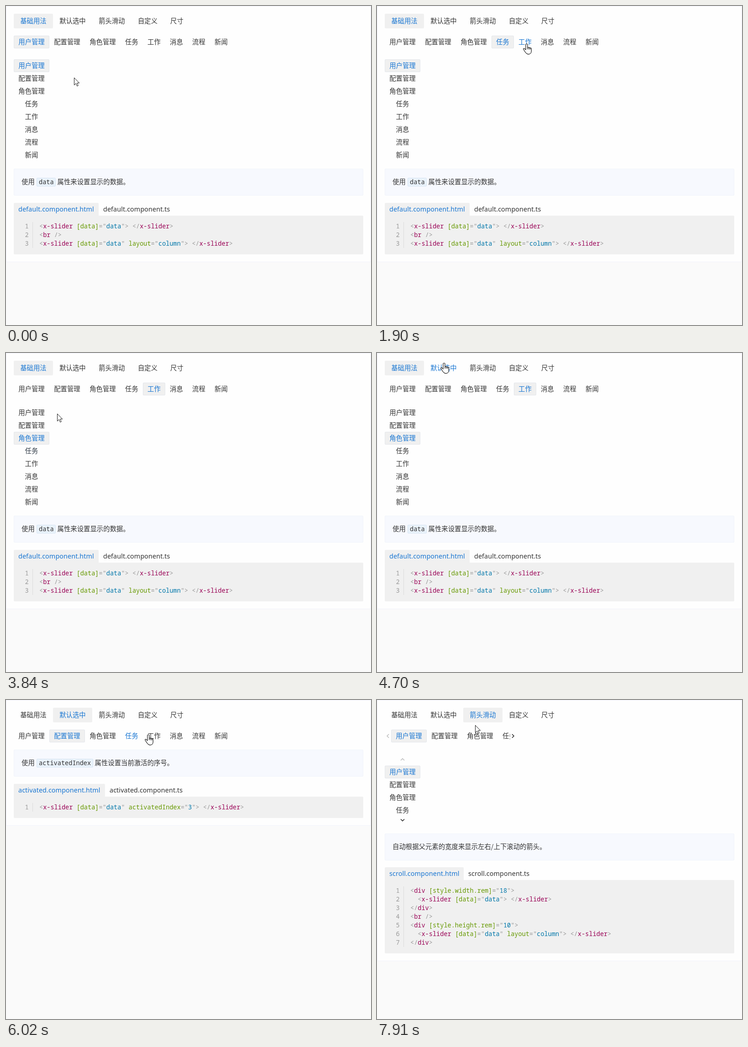
Write an HTML page that moves like this. It is 800 px wide and 700 px high and loops after 8 s.

```html
<!DOCTYPE html>
<html lang="zh-CN">
<head>
<meta charset="utf-8">
<title>Slider demo</title>
<style>
html, body { margin: 0; width: 100%; height: 100%; overflow: hidden; background: #fafafa; }
svg { display: block; }
text { font: 14.4px "Noto Sans CJK SC", "Noto Sans CJK", "Noto Sans CJK JP", sans-serif; fill: #333; white-space: pre; }
.mono { font: 13.6px "Noto Sans Mono", monospace; }
.file { font: 14.4px "Noto Sans", "Open Sans", sans-serif; letter-spacing: .06px; }
</style>
</head>
<body>
<svg id="stage" width="800" height="700"></svg>
<script>
const BLUE = '#1976d2', GREY = '#f0f0f0', LOOP = 8000;
const stage = document.getElementById('stage');

function add(parent, tag, attrs, text) {
  const el = document.createElementNS('http://www.w3.org/2000/svg', tag);
  for (const k in attrs) el.setAttribute(k, attrs[k]);
  if (text !== undefined) el.textContent = text;
  parent.append(el);
  return el;
}
const rect = (p, x, y, width, height, fill, more) =>
  add(p, 'rect', { x, y, width, height, fill, ...more });
const outlined = (p, x, y, w, h, fill, stroke) =>
  rect(p, x + .5, y + .5, w - 1, h - 1, fill, { stroke, rx: 1.5 });
const label = (p, x, y, s, more) => add(p, 'text', { x, y, ...more }, s);
const chevron = (p, x, y, turn, stroke) => add(p, 'path', {
  d: 'M-2 -4L2 0L-2 4', fill: 'none', stroke, 'stroke-width': 1.5,
  transform: `translate(${x} ${y}) rotate(${turn})` });

// A row or column of labels with one highlighted box.
function slider(parent, page, x, y, names, { column, tabs, first = 0 } = {}) {
  const h = tabs ? 32 : 28;
  const inset = tabs ? 0 : .5;
  const mark = tabs ? rect(parent, 0, 0, 1, 1, GREY, { rx: 2 })
                    : outlined(parent, 0, 0, 2, 2, GREY, '#e3e6eb');
  const items = names.map(name => {
    const w = column ? 78 : Math.floor(14.4 * name.length + (tabs ? 28.5 : 20.5));
    const item = { x, y, w, h };
    item.el = label(parent, x + (w - 14.4 * name.length) / 2, y + h / 2 + 5, name);
    column ? y += h : x += w;
    return item;
  });
  return { page, first, mark, inset, items };
}

function paint({ mark, inset, items, active }, t) {
  const a = items[active];
  const box = { x: a.x + inset, y: a.y + inset, width: a.w - 2 * inset, height: a.h - 2 * inset };
  for (const k in box) mark.setAttribute(k, box[k]);
  items.forEach((item, i) => {
    const k = i === active ? 1 : heat(item, t);
    const mix = [25, 118, 210].map(c => Math.round(51 + (c - 51) * k));
    item.el.style.fill = `rgb(${mix})`;
  });
}

function codeLine(parent, y, source) {
  const colors = ['#999', '#905', '#690', '#999', '#07a', '#999', '#999', '#333'];
  const el = label(parent, 73, y, '', { class: 'mono' });
  const token = /(<\/?)([\w-]+)|([\[\]\w.]+)(=")([^"]*)(")|(\/?>)|(\s+)/g;
  for (const m of source.matchAll(token))
    m.slice(1).forEach((s, i) => s && add(el, 'tspan', { fill: colors[i] }, s));
}

// Card with description, file tabs and listing; noteY and fileY are their tops.
function panel(noteY, fileY, file, fileW, [before, key, after], code) {
  const g = add(stage, 'g'), top = fileY + 28, h = code.length * 19 + 28;
  rect(g, .5, .5, 799, top + h + 16, '#fefefe', { stroke: '#f1f3fb' });
  outlined(g, 17, noteY, 766, 59, '#f7f9fe', '#f0f4fb');
  label(g, 34, noteY + 34, before);
  if (key) {
    const w = Math.round(8.16 * key.length + 9.6);
    outlined(g, 67, noteY + 20, w, 19, '#e9f2fb', '#d8e6f3');
    label(g, 72, noteY + 34, key, { class: 'mono' });
    label(g, 70.5 + w, noteY + 34, after);
  }
  rect(g, 17, fileY, fileW, 30, GREY, { rx: 2 });
  rect(g, 17, top, 766, h, GREY, { rx: 2 });
  label(g, 27, fileY + 19, file + '.component.html', { class: 'file', style: 'fill:' + BLUE });
  label(g, 27 + fileW, fileY + 19, file + '.component.ts', { class: 'file' });
  rect(g, 58, top + 14, 1, h - 28, '#dcdcdc');
  code.forEach((s, i) => {
    const y = top + 28 + 19 * i;
    label(g, 41.5, y, i + 1, { class: 'mono', style: 'fill:#999' });
    codeLine(g, y, s);
  });
  return g;
}

const names = ['用户管理', '配置管理', '角色管理', '任务', '工作', '消息', '流程', '新闻'];
const few = names.slice(0, 4);
const plain = '<x-slider [data]="data"> </x-slider>';
const upright = '<x-slider [data]="data" layout="column"> </x-slider>';

const basic = panel(357, 432, 'default', 186, ['使用', 'data', '属性来设置显示的数据。'],
  [plain, '<br />', upright]);
const preset = panel(109, 184, 'activated', 200, ['使用', 'activatedIndex', '属性设置当前激活的序号。'],
  ['<x-slider [data]="data" activatedIndex="3"> </x-slider>']);
const scroll = panel(293, 367, 'scroll', 173, ['自动根据父元素的宽度来显示左右/上下滚动的箭头。'],
  ['<div [style.width.rem]="18">', '  ' + plain, '</div>', '<br />',
   '<div [style.height.rem]="10">', '  ' + upright, '</div>']);
const panels = [basic, preset, scroll];

const clip = add(scroll, 'svg', { width: 292, height: 110 });
chevron(scroll, 24, 79, 180, '#bbb');
chevron(scroll, 298, 79, 0, '#222');
chevron(scroll, 56, 130.5, -90, '#bbb');
chevron(scroll, 56, 263.5, 90, '#222');

const tabs = slider(stage, null, 17, 17, ['基础用法', '默认选中', '箭头滑动', '自定义', '尺寸'], { tabs: true });
const views = [
  tabs,
  slider(basic, 0, 17, 65, names),
  slider(basic, 0, 17, 117, names, { column: true }),
  slider(preset, 1, 17, 65, names, { first: 3 }),
  slider(clip, 2, 31, 65, few),
  slider(scroll, 2, 17, 144, few, { column: true })
];
const visible = () => views.filter(v => v === tabs || v.page === tabs.active);

// Pointer stops: arrival time, x, y, whether it clicks there.
const REST = 140, PRESS = 100;
const stops = [
  [0, 149, 157], [580, 134, 83, true], [1000, 212, 84, true], [1400, 276, 84, true],
  [1650, 327, 83], [1900, 328, 83, true], [2420, 62, 160, true], [2600, 63, 187, true],
  [2890, 64, 289], [3050, 65, 288], [4350, 145, 26], [4700, 147, 22, true],
  [5480, 134, 80, true], [5840, 290, 78], [6020, 312, 76], [6240, 324, 81, true],
  [6440, 372, 82, true], [6620, 422, 82, true], [7130, 246, 39], [7330, 232, 33, true],
  [7910, 215, 55]
];

// Rest at each stop, then ease to arrive at the next one on time.
function pointer(t) {
  const i = Math.max(0, stops.findLastIndex(s => s[0] <= t));
  const [t0, x0, y0] = stops[i], [t1, x1, y1] = stops[i + 1] || [LOOP + REST, x0, y0];
  const u = Math.max(0, (t - t0 - REST) / (t1 - t0 - REST));
  const k = u * u * (3 - 2 * u);
  return [x0 + (x1 - x0) * k, y0 + (y1 - y0) * k];
}
const inside = ({ x, y, w, h }, [px, py]) => px >= x && px < x + w && py >= y && py < y + h;

// Hover colour fades in and out with a short delay.
function heat(item, t) {
  let hits = 0;
  for (let k = 0; k < 8; k++) hits += inside(item, pointer(t - 80 - 20 * k));
  return hits / 8;
}

// Every click so far selects whatever lies under it.
function select(t) {
  views.forEach(v => v.active = v.first);
  for (const [time, x, y, click] of stops) {
    if (!click || time + PRESS > t) continue;
    for (const v of visible()) {
      const hit = v.items.findIndex(i => inside(i, [x, y]));
      if (hit >= 0) v.active = hit;
    }
  }
}

const ink = { fill: '#fff', stroke: '#151515', 'stroke-linejoin': 'round' };
const arrow = add(stage, 'path', { ...ink, d: 'M.5 .5v16l3.7-3.6 2.6 5.9 2.5-1.1-2.5-5.7h4.9z' });
const hand = add(stage, 'path', { ...ink, 'stroke-width': 1.2,
  d: 'M-2 2a2 2 0 0 1 4 0v6a2 1.8 0 0 1 3 .5a2 1.8 0 0 1 2.7 .8a1.7 1.6 0 0 1 2.6 1.7v5' +
     'c0 4-2.5 6.8-6.3 6.8c-4 0-6.2-3-8.5-6.8l-2.5-4c-.8-1.6 1.2-2.6 2.4-1.4l2.6 2.6z' +
     'M2 8v4M5 8.5v3.8M7.7 9.3v3.2' });

function draw(t) {
  const pos = pointer(t);
  select(t);
  panels.forEach((p, i) => p.style.display = i === tabs.active ? '' : 'none');
  const shown = visible();
  shown.forEach(v => paint(v, t));
  const over = shown.some(v => v.items.some(i => inside(i, pos)));
  hand.style.display = over ? '' : 'none';
  arrow.style.display = over ? 'none' : '';
  (over ? hand : arrow).setAttribute('transform', `translate(${pos.map(Math.round)})`);
}

const start = performance.now();
function tick() {
  draw((performance.now() - start) % LOOP);
  requestAnimationFrame(tick);
}
tick();
</script>
</body>
</html>
```
